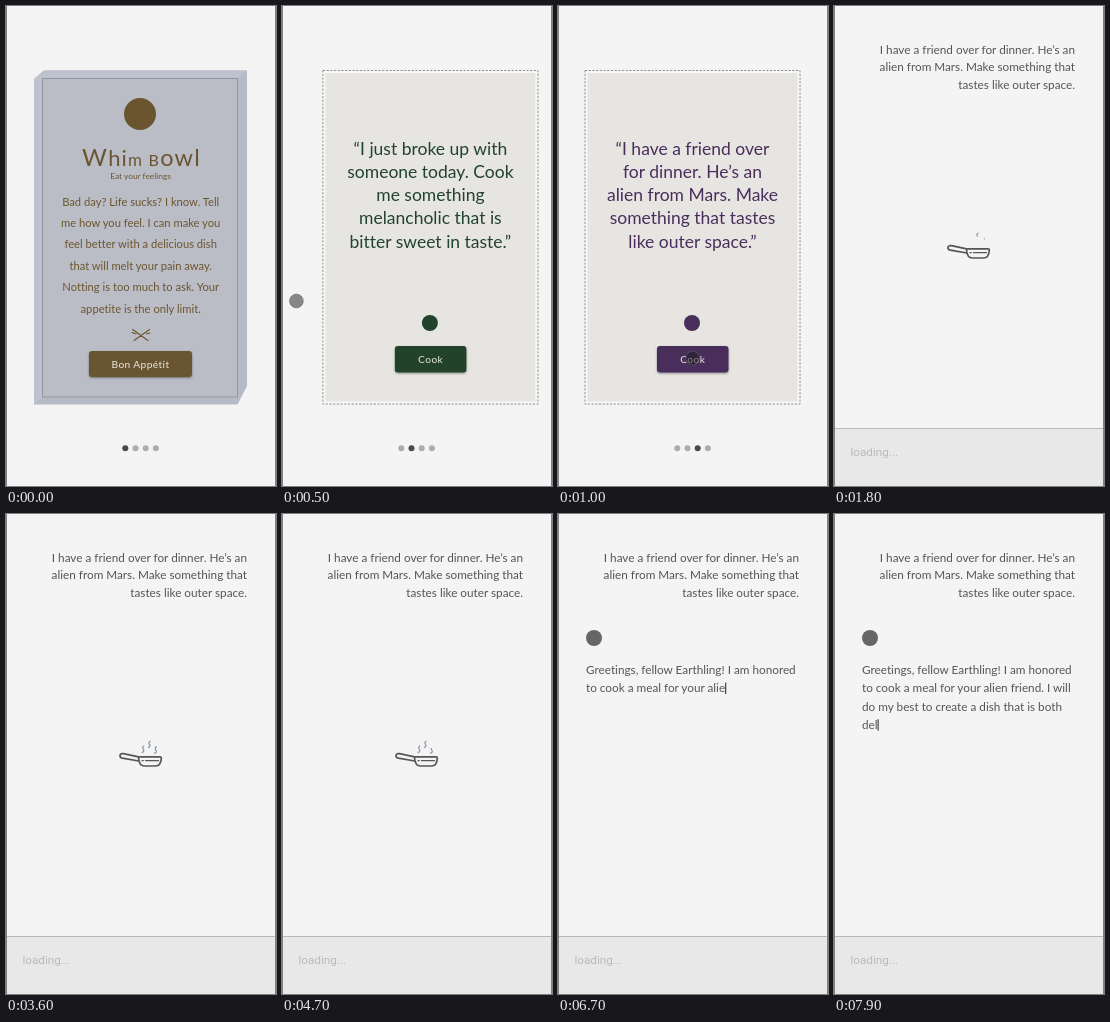
An HTML page that plays this animation: 270 by 480 pixels, repeating every 8 s.

```html
<!DOCTYPE html>
<html lang="en">
<head>
<meta charset="utf-8">
<title>Recipe chat</title>
<style>
  html, body { margin: 0; width: 100%; height: 100%; overflow: hidden; background: #f4f4f4; }
  svg { display: block; width: 100vw; height: 100vh; }
  text { font-family: Lato, "Open Sans", sans-serif; font-variant-ligatures: none; white-space: pre; }
  .mid { text-anchor: middle; }
  .end { text-anchor: end; }
  .label { font-size: 10.2px; letter-spacing: .4px; fill: #ece8e2; text-anchor: middle; }
  .quote { font-size: 17.5px; text-anchor: middle; }
  .chat { font-size: 11.75px; fill: #555; }
</style>
</head>
<body>
<svg viewBox="0 0 270 480">
  <defs>
    <filter id="shadow" x="-10%" y="-20%" width="120%" height="150%">
      <feDropShadow dx="0" dy="1" stdDeviation="1" flood-opacity=".4"/>
    </filter>
  </defs>
  <rect width="270" height="480" fill="#f4f4f4"/>

  <g id="intro">
    <g id="pages"></g>
    <g id="dots"></g>
    <circle id="finger" r="6.8" stroke="#6e6e6e" stroke-width=".8"/>
  </g>

  <g id="chat">
    <g id="request"></g>
    <g id="pan" fill="none" stroke="#555" stroke-width="1.7" stroke-linecap="round" stroke-linejoin="round">
      <path d="M132.6 242.8L117.5 239.6Q114.3 239.2 114 241.4T116.3 244.2L132.8 247"/>
      <path d="M133.8 242.8H154Q155.5 242.8 155.3 244.5Q154.8 252 149.5 252H138.5Q133.2 252 132.6 244.5Q132.5 242.8 133.8 242.8Z" fill="#f4f4f4"/>
      <path d="M136 246.7H137.2M139.5 246.7H152.5" stroke-width="1.3"/>
      <g id="steam" stroke="#8793a8" stroke-width="1.2"></g>
    </g>
    <g id="reply">
      <circle cx="36" cy="124" r="8" fill="#666"/>
      <g id="typed"></g>
      <rect id="caret" width="1.1" height="11.5" fill="#333"/>
    </g>
    <rect y="422" width="270" height="58" fill="#e8e8e8"/>
    <path d="M0 422.5H270" stroke="#b8b8b8"/>
    <text x="16.5" y="449.6" font-size="11.7" fill="#bababa" style="font-family: Roboto, sans-serif">loading...</text>
    <rect y="479" width="270" height="1" fill="#e2e9df"/>
  </g>
  <path d="M.5 0V480M269.5 0V480" stroke="#808080"/>
</svg>

<script>
const LOOP = 8000, STEP = 100, PAGE = 270;
const BROWN = '#6b5530';
const $ = id => document.getElementById(id);
const clamp = v => Math.max(0, Math.min(1, v));
const progress = (t, from, to) => clamp((t - from) / (to - from));
const ease = x => x < .5 ? 2 * x * x : 1 - 2 * (1 - x) ** 2;

const textLines = (lines, x, y, gap, attrs) => lines.map((line, i) =>
  `<text x="${x}" y="${y + i * gap}" ${attrs}>${line}</text>`).join('');

const button = (x, y, w, h, color, label) =>
  `<rect x="${x}" y="${y}" width="${w}" height="${h}" rx="3" fill="${color}" filter="url(#shadow)"/>
   <text class="label" x="${x + w / 2}" y="${y + 17}">${label}</text>`;

const utensils = `<g fill="none" stroke="${BROWN}" stroke-width="1.1" stroke-linecap="round">
  <path d="M130 326L142 334.5M140 326L128 334.5M126.5 323.5L131 326.5M126 326.5L130 328M143.5 323.5L139.5 326.5M144 327L140.5 328"/></g>`;

const titleParts = [['W', 24], ['hi', 22], ['m', 17], [' B', 16], ['owl', 23.5]];

function welcomePage() {
  const title = titleParts.map(([s, size]) => `<tspan font-size="${size}">${s}</tspan>`).join('');
  const story = ['Bad day? Life sucks? I know. Tell', 'me how you feel. I can make you',
    'feel better with a delicious dish', 'that will melt your pain away.',
    'Notting is too much to ask. Your', 'appetite is the only limit.'];
  return `<path d="M28 73L38 64.5H241V380L231.5 398.5H28Z" fill="#b6bac6"/>
    <path d="M28 73L38 64.5H241L232 72.5H36.5V391L28 398.5Z" fill="#bec2ce"/>
    <rect x="36.5" y="72.5" width="195" height="318.5" fill="#bbbdc6" stroke="#8f929b" stroke-width=".9"/>
    <circle cx="134" cy="108" r="16" fill="${BROWN}"/>
    <text class="mid" x="135.5" y="160" fill="${BROWN}" letter-spacing="1.2">${title}</text>
    <text class="mid" x="134.5" y="173" fill="${BROWN}" font-size="8.4">Eat your feelings</text>
    ${textLines(story, 134.7, 199.5, 21.4, `class="mid" font-size="11.2" fill="${BROWN}"`)}
    ${utensils}${button(83, 345, 103, 26, BROWN, 'Bon Appétit')}`;
}

const quotePage = (lines, color) =>
  `<rect x="27" y="64.5" width="215" height="333.5" fill="#f7f7f6" stroke="#858585" stroke-width=".9" stroke-dasharray="2.2 1.5"/>
   <rect x="29.5" y="67" width="210" height="328.5" fill="#e7e5e2"/>
   ${textLines(lines, 134.5, 148.7, 23.2, `class="quote" fill="${color}"`)}
   <circle cx="134" cy="317" r="8" fill="${color}"/>
   ${button(99, 340, 71.5, 26.5, color, 'Cook')}`;

const pages = [
  welcomePage(),
  quotePage(['“I just broke up with', 'someone today. Cook', 'me something',
    'melancholic that is', 'bitter sweet in taste.”'], '#21432c'),
  quotePage(['“I have a friend over', 'for dinner. He’s an', 'alien from Mars. Make',
    'something that tastes', 'like outer space.”'], '#492e5b')
];
$('pages').innerHTML = pages.map((p, i) => `<g transform="translate(${i * PAGE})">${p}</g>`).join('');
$('dots').innerHTML = [0, 1, 2, 3].map(i => `<circle cx="${119.3 + i * 10.2}" cy="442.3" r="3"/>`).join('');
$('request').innerHTML = textLines(['I have a friend over for dinner. He’s an',
  'alien from Mars. Make something that', 'tastes like outer space.'], 241, 48, 17.4, 'class="chat end"');

const reply = ['Greetings, fellow Earthling! I am honored ', 'to cook a meal for your alien friend. I will ',
  'do my best to create a dish that is both ', 'delicious'];
const lineY = i => 160 + i * 18.3;
$('typed').innerHTML = textLines(reply.map(() => ''), 28, 160, 18.3, 'class="chat"');

// Left, middle and right wisps, each with the phase at which it starts to leave.
const wisps = [[137, 231.8, .5], [143.2, 227, .8], [149.5, 232.6, .57]];
$('steam').innerHTML = wisps.map(([x, y]) =>
  `<path pathLength="1" stroke-linecap="butt" d="M${x - 1.3} ${y + 6.8}q3.2 -1.2 1.6 -3.4t1 -3.4"/>`).join('');

function drawIntro(t) {
  const first = ease(progress(t, 50, 586)), second = ease(progress(t, 600, 940));
  const scroll = first + second;
  $('intro').setAttribute('opacity', 1 - progress(t, 1100, 1350));
  $('pages').setAttribute('transform', `translate(${-PAGE * scroll})`);
  [...$('dots').children].forEach((dot, i) =>
    dot.setAttribute('fill', i === Math.round(scroll) ? '#4a4a4e' : '#adadad'));

  const finger = $('finger'), tapping = t >= 1000;
  const drag = second > 0 ? second : first;
  finger.setAttribute('cx', tapping ? 134.5 : PAGE * (1 - drag) + .5);
  finger.setAttribute('cy', tapping ? 352 : 295);
  finger.setAttribute('fill', tapping ? 'rgba(25,25,30,.5)' : '#878787');
  finger.setAttribute('stroke-dasharray', tapping ? '1.5 1' : 'none');
  finger.setAttribute('opacity', drag > 0 && drag < 1 || tapping ? 1 : 0);
}

function drawSteam(t) {
  const phase = ((t - 720) % 1200 + 1200) % 1200 / 1200;
  [...$('steam').children].forEach((wisp, i) => {
    const leave = wisps[i][2];
    const head = progress(phase, i * .06, i * .06 + .26);
    const tail = progress(phase, leave, Math.min(1, leave + .36));
    const length = Math.max(0, head - tail);
    wisp.setAttribute('stroke-dasharray', `${length} 2`);
    wisp.setAttribute('stroke-dashoffset', -tail);
    wisp.setAttribute('opacity', length ? 1 : 0);
  });
}

function drawReply(t) {
  let left = Math.max(0, Math.floor((t - 5300) / 19.8));
  let row = 0;
  [...$('typed').children].forEach((el, i) => {
    el.textContent = reply[i].slice(0, left);
    if (left > 0) row = i;
    left = Math.max(0, left - reply[i].length);
  });
  const line = $('typed').children[row];
  $('caret').setAttribute('x', 28 + (line.textContent ? line.getComputedTextLength() : 0));
  $('caret').setAttribute('y', lineY(row) - 9.7);
}

function draw(t) {
  const cooked = t >= 5200;
  drawIntro(t);
  $('chat').setAttribute('opacity', progress(t, 1200, 1500));
  $('pan').setAttribute('visibility', cooked ? 'hidden' : 'visible');
  $('reply').setAttribute('visibility', cooked ? 'visible' : 'hidden');
  drawSteam(t);
  drawReply(t);
}

const start = performance.now();
function tick() {
  const t = (performance.now() - start) % LOOP;
  draw(Math.floor(t / STEP) * STEP);
  requestAnimationFrame(tick);
}
tick();
</script>
</body>
</html>
```
